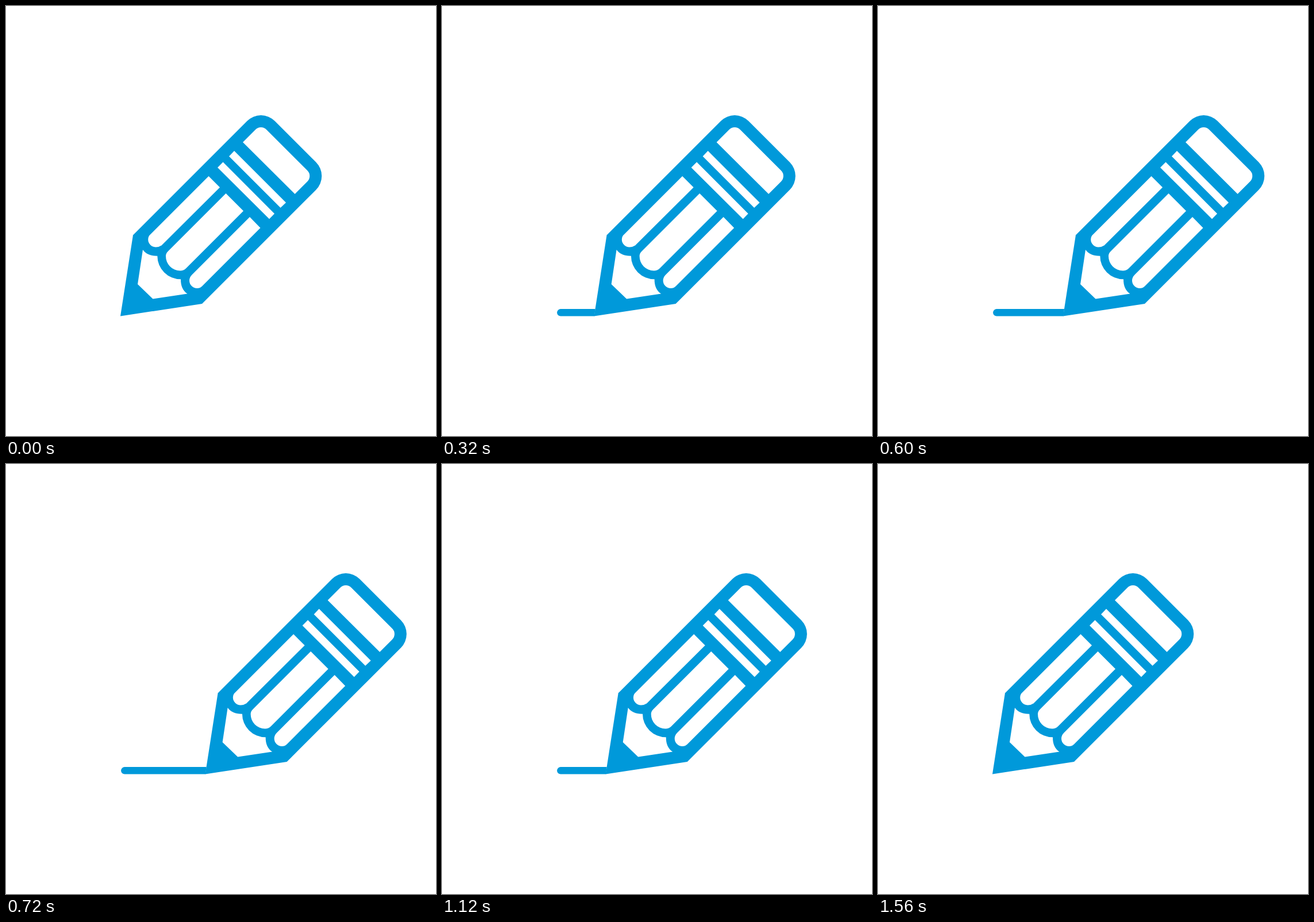
An HTML page for the animation above (1960 ms loop, 748 px wide and 748 px high).

```html
<!DOCTYPE html>
<html lang="en">
<head>
<meta charset="utf-8">
<title>Pencil drawing a line</title>
<style>
  html, body { margin: 0; height: 100%; overflow: hidden; background: #fff; }
  svg { display: block; width: 100%; height: 100%; }
</style>
</head>
<body>
<svg viewBox="0 0 748 748" fill="#0099da">
  <path id="line"/>
  <g id="pencil">
    <path d="M199 539.5 221 398.5 419.5 200A34 34 0 0 1 467.5 200L539.3 271.8A34 34 0 0 1 539.3 319.8L341 518Z"/>
    <g fill="#fff">
      <!-- eraser and ferrule -->
      <path d="M412 237 434 215A13.3 13.3 0 0 1 453 215L524.3 286.3A13.3 13.3 0 0 1 524.3 305.2L502.5 327Z"/>
      <path d="M397 252 487 342 477.5 351 388 261.5ZM377.5 271.5 467 361.2 458 370.5 368 281Z"/>
      <!-- barrel -->
      <path d="M352.5 296 372 315.5 270.5 416.5Q266 419.5 260.5 419.5A13.4 13.4 0 0 1 247.2 406Q247.2 400.5 252 396.5Z"/>
      <path d="M382.5 326 413 356.5 313 456.5Q309 460.5 303 460.5A25.2 25.2 0 0 1 278 435Q278 430.5 282 426.5Z"/>
      <path d="M424 367 442.5 386 341 487.5Q337.5 491 332.5 491A13.4 13.4 0 0 1 319 477.5Q319 472 323.5 467.5Z"/>
      <!-- wood -->
      <path d="M238 424 229 484 255.5 509.5 315.5 500.5C307.5 495.5 304 487 304 475.3A40.5 40.5 0 0 1 263.3 434.7C252 435 243.5 431.5 238 424Z"/>
    </g>
  </g>
</svg>
<script>
  const LOOP = 1960, STEP = 40, TURN = 760, HOME = 1560, REACH = 155.8;
  const pencil = document.getElementById('pencil');
  const line = document.getElementById('line');

  function shiftAt(t) {
    return t < TURN ? REACH * t / TURN : REACH * Math.max(0, HOME - t) / (HOME - TURN);
  }

  function draw() {
    const t = Math.floor(performance.now() % LOOP / STEP) * STEP;
    const x = shiftAt(t);
    pencil.setAttribute('transform', `translate(${x})`);
    line.setAttribute('d', x ? `M206.3 527.1A6.2 6.2 0 0 0 206.3 539.5H${199.5 + x}L${201 + x} 527.1Z` : '');
    requestAnimationFrame(draw);
  }
  draw();
</script>
</body>
</html>
```
